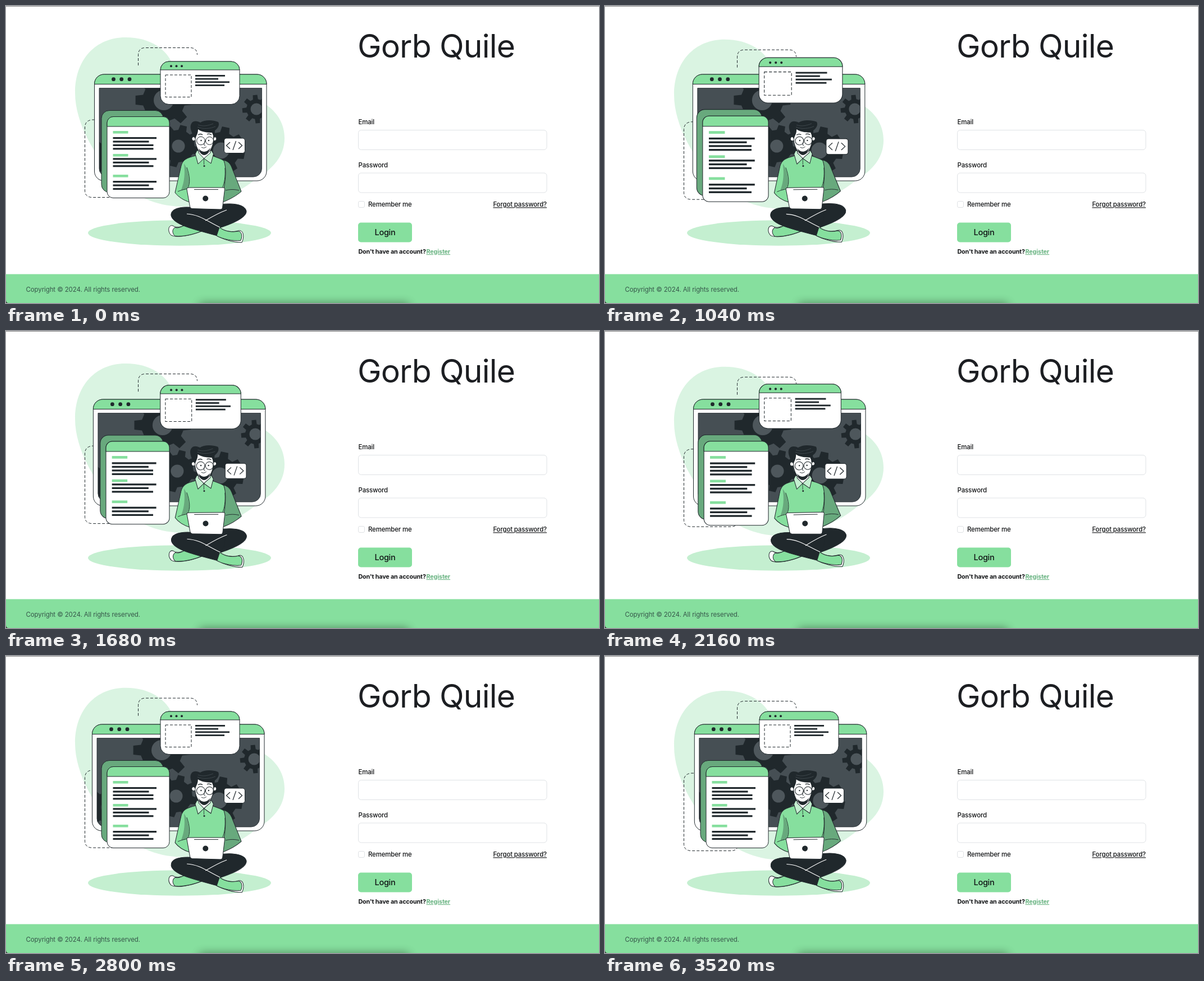
Recreate the animation shown at these times as an HTML page with a canvas. Size 1056 by 530 pixels, loop 3600 ms.

```html
<!DOCTYPE html>
<html lang="en">
<head>
<meta charset="utf-8">
<title>Login</title>
<style>
  html, body { margin: 0; width: 100%; height: 100%; overflow: hidden; background: #fff; }
  canvas, svg { position: absolute; left: 0; top: 0; width: 1056px; height: 530px; }
  text { font-family: Inter, Roboto, sans-serif; font-size: 11.4px; font-weight: 450; letter-spacing: -.12px; fill: #101214; }
  .title { font-size: 57px; font-weight: 400; letter-spacing: -.8px; fill: #1c1e22; }
  .login { font-size: 14.5px; letter-spacing: -.3px; }
  .bold { font-size: 10.7px; font-weight: 700; letter-spacing: -.1px; }
  .copy { font-size: 11.5px; font-weight: 400; fill: #36574a; letter-spacing: -.1px; }
  .link { text-decoration: underline; }
  .field { fill: #fff; stroke: #dfe2e5; }
</style>
</head>
<body>
<canvas id="art"></canvas>
<svg viewBox="0 0 1056 530">
  <defs>
    <filter id="blur" x="-20%" y="-200%" width="140%" height="500%"><feGaussianBlur stdDeviation="8"/></filter>
  </defs>
  <rect width="1056" height="1" fill="#858585"/>
  <text class="title" x="626" y="92">Gorb Quile</text>
  <text x="627.5" y="211">Email</text>
  <rect class="field" x="627.5" y="221.5" width="335.5" height="35" rx="5"/>
  <text x="627.5" y="287.5">Password</text>
  <rect class="field" x="627.5" y="298" width="335.5" height="35" rx="5"/>
  <rect class="field" x="627.5" y="348.5" width="11" height="11" rx="2.5"/>
  <text x="645" y="358.3">Remember me</text>
  <text class="link" x="963" y="358.3" text-anchor="end">Forgot password?</text>
  <rect x="627" y="386.5" width="96" height="35" rx="5" fill="#86df9e"/>
  <text class="login" x="675" y="409.3" text-anchor="middle">Login</text>
  <text class="bold" x="627.5" y="442">Don't have an account?</text>
  <text class="bold link" x="748.5" y="442" style="fill:#68b381">Register</text>
  <rect y="478.5" width="1056" height="51.5" fill="#86df9e"/>
  <text class="copy" x="35.5" y="510">Copyright © 2024. All rights reserved.</text>
  <rect x="343" y="530" width="376" height="20" rx="8" fill="#000" opacity=".4" filter="url(#blur)"/>
  <path d="M0 525Q0 530 5 530H0Z" fill="#333"/>
</svg>
<script>
const LOOP = 3600, STEP = 80;
const GREEN = '#86df9e', PALE = '#daf4e2', MINT = '#c4efd0', DEEP = '#68a97d';
const INK = '#20282c', SCREEN = '#464f54', HUB = '#4e575c', WHITE = '#fff';

const canvas = document.getElementById('art');
const ctx = canvas.getContext('2d');
const dpr = window.devicePixelRatio || 1;
canvas.width = 1056 * dpr;
canvas.height = 530 * dpr;

function paint(path, fill, stroke, width = 1) {
  if (fill) { ctx.fillStyle = fill; ctx.fill(path); }
  if (stroke) { ctx.strokeStyle = stroke; ctx.lineWidth = width; ctx.stroke(path); }
}
function shape(d, fill, stroke, width) { paint(new Path2D(d), fill, stroke, width); }
function roundBox(x, y, w, h, r) {
  const p = new Path2D();
  p.roundRect(x, y, w, h, r);
  return p;
}
function box(x, y, w, h, r, fill, stroke) { paint(roundBox(x, y, w, h, r), fill, stroke); }
function disc(x, y, r, fill, stroke, width) {
  const p = new Path2D();
  p.arc(x, y, r, 0, Math.PI * 2);
  paint(p, fill, stroke, width);
}
function bar(x, y, w, h = 3.2, fill = INK) {
  ctx.fillStyle = fill;
  ctx.fillRect(x, y, w, h);
}
function dashed(d) {
  ctx.setLineDash([5, 3]);
  shape(d, null, INK);
  ctx.setLineDash([]);
}
function group(draw) {
  ctx.save();
  draw();
  ctx.restore();
}

// Piecewise linear track of [time, value] keys
function track(keys, t) {
  if (t <= keys[0][0]) return keys[0][1];
  for (let i = 1; i < keys.length; i++) {
    const [a, u] = keys[i - 1], [b, v] = keys[i];
    if (t < b) return u + (v - u) * (t - a) / (b - a);
  }
  return keys[keys.length - 1][1];
}
const shake = [[0, 0], [560, -2], [1040, -1.2], [1680, -2.1], [2160, 0], [2800, -4], [3520, 1.8], [3600, 2]];
const beat = [[678, 0], [1098, .064], [1518, 0], [1938, .047], [2778, 0]];
function sway(t) {
  const p = ((t - 678) / 1500 + 1) % 1;
  return Math.abs(1 - 2 * p) - .096;
}

function backdrop() {
  shape('M213 56C258 56 287 78 297 105C320 150 420 152 460 174C485 190 496 212 496 236C496 268 475 290 450 305C418 332 365 358 310 358C265 356 232 340 200 312C160 272 123 210 123 155C123 95 160 56 213 56Z', PALE);
  dashed('M235.5 106V88Q235.5 74.5 248 74.5H328Q340 74.5 340.5 87');
  dashed('M190 203H154Q140.5 204 140.5 217V329Q140.5 341.5 154 341.5H224Q236 341.5 237 331');
}

function gear(x, y, outer, inner, hub, teeth = 8, turn = 0) {
  const p = new Path2D(), unit = Math.PI * 2 / teeth;
  for (let i = 0; i < teeth; i++) {
    const corners = [[-.32, inner], [-.2, outer], [.2, outer], [.32, inner]];
    for (const [k, r] of corners) {
      const a = turn + (i + k) * unit;
      p.lineTo(x + r * Math.cos(a), y + r * Math.sin(a));
    }
  }
  p.closePath();
  paint(p, INK);
  disc(x, y, hub, HUB);
}

function monitor() {
  box(157.5, 122, 306.5, 190, 17, WHITE, INK);
  box(157.5, 122, 306.5, 17.5, [17, 17, 0, 0], GREEN, INK);
  for (const x of [191.5, 205.7, 220]) disc(x, 130.7, 3.4, INK);
  const screen = roundBox(166, 146.5, 289.5, 158.5, [0, 0, 15, 15]);
  paint(screen, SCREEN);
  group(() => {
    ctx.clip(screen);
    gear(281, 168, 51, 38, 18);
    gear(446, 184, 25.5, 18, 10.5, 8, -.1);
    gear(185, 270, 36, 27, 12);
    gear(307, 250, 38, 29, 11.5, 8, .25);
    gear(383, 258, 43, 33, 14.5, 8, .2);
  });
  paint(screen, null, INK, .8);
}

function smallWindow() {
  box(275, 99, 141, 76.5, 15, WHITE, INK);
  box(275, 99, 141, 15, [15, 15, 0, 0], GREEN, INK);
  for (const x of [294, 303.5, 313]) disc(x, 107.3, 2, INK);
  dashed('M284 123H330V162.5H284Z');
  [53, 41, 61, 52].forEach((w, i) => bar(337, 123 + i * 5.7, w, 2.8));
}

function docs() {
  box(170, 186.5, 110, 146, 14, DEEP, INK);
  box(180, 197.5, 111, 145, 11, WHITE, INK);
  box(180, 197.5, 111, 17.5, [11, 11, 0, 0], GREEN, INK);
  const widths = [77.5, 64, 72, 72];
  for (const [top, first, n] of [[223, 234, 4], [264, 271.3, 3], [301, 312, 3]]) {
    bar(190.5, top, 27, 4.6, GREEN);
    for (let i = 0; i < n; i++) bar(190.5, first + i * 6.4, widths[i]);
  }
}

function badge() {
  box(388.5, 236, 37, 26.5, 4, WHITE, INK);
  shape('M399 243L392.5 249L399 255M409.5 241L404 257M414 243L420.5 249L414 255', null, INK, 1.2);
}

function legs() {
  shape('M320 391C311 394 304 397 297 392C289 390 287 402 294 409C304 414 328 410 348 402Z', WHITE, INK);
  shape('M320 391C313 393 306 398 301 395C295 399 296 406 301 410.5C315 412 332 408 348 402Z', GREEN, INK);
  shape('M374 355C398 351 425 352 428 366C429 377 405 388 380 396L350 394Z', INK, INK);
  shape('M328 359C304 358 293 364 294 374C297 388 326 396 347 402L376 410L382 395C389 386 391 372 388 356Z', INK, INK);
  shape('M380 395C390 403 404 404 414 401C423 399 425 412 420 422C404 422 386 416 375 410Z', WHITE, INK);
  shape('M380 395C390 403 404 404 412 402C419 401 422 409 418 418.5C404 420 386 416 375 410Z', GREEN, INK);
  shape('M322 371C344 372 358 384 381 395M355 383C367 376 379 369 393 364', null, WHITE, 1.1);
}

function torso() {
  shape('M386 275C394 276 399 280 402 288L419 331C411 338 399 345 386 350L376 320Z', DEEP, INK);
  shape('M338 267C322 271 315 274 312 285L301 333C307 341 317 347 327 350L334 355H380L388 326C391 308 393 290 388 276C382 272 374 270 367 267Z', GREEN, INK);
  shape('M317 281C319 298 318 313 312 328C319 329 327 325 326 311C325 298 322 289 317 281Z', DEEP);
  shape('M322 288C327 302 329 317 323 326M306 331C313 328 319 327 324 326M390 289C391 305 389 316 385 325M391 329C399 327 407 327 415 329', null, INK, .9);
  shape('M340 258L337 264L342 282L352.5 272L365 281L369.5 264L366 258Z', MINT, INK);
  shape('M352.5 272V283', null, INK, .8);
  disc(353, 285.5, 1.5, INK);
}

function head() {
  shape('M343 252V262L352.5 272L364 262V252Z', WHITE, INK);
  disc(334.5, 237, 3.6, WHITE, INK);
  disc(371.5, 237, 3.4, WHITE, INK);
  shape('M337 218V240C338 252 345 265 353 265C361 265 368 253 369.5 240V218Z', WHITE, INK);
  shape('M343 254C348 262 358 262 364 253C361 262 357 266 353 266C348 266 345 261 343 254Z', INK);
  shape('M337 237C331 229 326 216 330 210C333 204 341 205 346 208C353 203 368 203 378 207C381 212 377 219 372 222L371 237L367 226C357 226 347 224 342 220C342 228 339 231 337 237Z', INK);
  shape('M342 212C351 216 361 213 369 210M341 216C351 220 364 219 373 215', null, SCREEN, .8);
  disc(347, 240.5, 7.4, null, INK);
  disc(362.5, 240.5, 7, null, INK);
  disc(347.5, 240, 1.2, INK);
  disc(361, 240, 1.2, INK);
  shape('M342 230Q347 227 350 230M358 229Q362 227 366 230', null, INK, 1.3);
  shape('M354.5 240L352.5 248L355 249M348 252Q353 255 357 251', null, INK, .9);
}

function laptop() {
  shape('M325 324H387Q390 324 389.5 327L385.5 360Q385 363 382 363L331 361.5Q328 361 327.5 358L322 327Q321.5 324 325 324Z', WHITE, INK);
  shape('M335 327.5H378', null, INK, 1);
  disc(355.2, 343.5, 5, INK);
}

function render(t) {
  const tilt = sway(t), grow = 1 + track(beat, t);
  ctx.setTransform(dpr, 0, 0, dpr, 0, 0);
  ctx.clearRect(0, 0, 1056, 530);
  ctx.lineJoin = 'round';

  group(() => { ctx.translate(0, 8.8 * tilt); backdrop(); });
  ctx.fillStyle = MINT;
  ctx.beginPath();
  ctx.ellipse(309, 405, 163, 22.8, 0, 0, Math.PI * 2);
  ctx.fill();
  group(() => { ctx.translate(track(shake, t), 0); monitor(); });
  group(() => {
    ctx.translate(291, 220);
    ctx.scale(grow, grow);
    ctx.translate(-291, -220);
    smallWindow();
    docs();
    badge();
  });
  group(() => {
    ctx.translate(352, 300);
    ctx.rotate(-1.5 * Math.PI / 180 * tilt);
    ctx.translate(-352, -300);
    legs();
    torso();
    head();
    laptop();
  });
}

function tick() {
  const t = performance.now() % LOOP;
  render(Math.floor(t / STEP) * STEP);
  requestAnimationFrame(tick);
}
tick();
</script>
</body>
</html>
```
